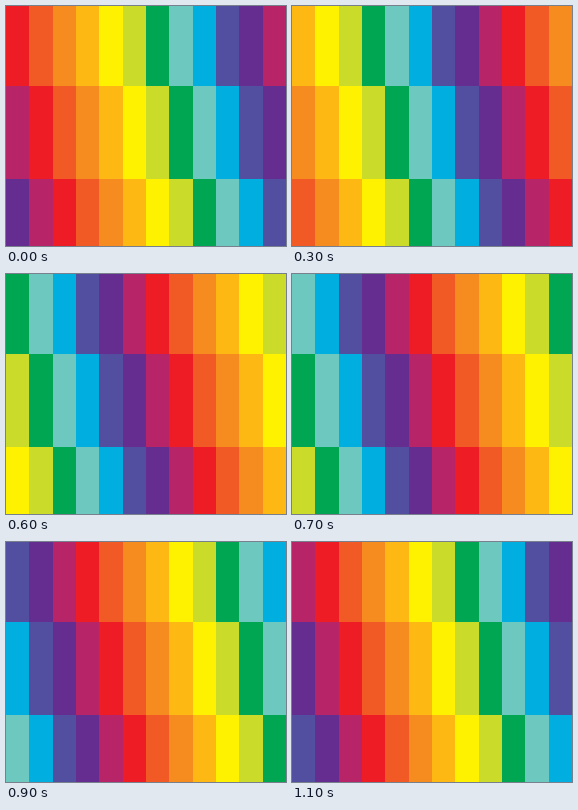
An HTML page with a canvas that plays this animation: 280x240 px, repeating every 1200 ms.

```html
<!DOCTYPE html>
<html lang="en">
<head>
<meta charset="utf-8">
<title>Rainbow bands</title>
<style>
html, body { margin: 0; width: 100%; height: 100%; overflow: hidden; }
canvas { display: block; }
</style>
</head>
<body>
<canvas id="stage" width="280" height="240"></canvas>
<script>
const ctx = document.getElementById('stage').getContext('2d');
const colors = ['#ee1c25', '#f15a24', '#f68b1f', '#fdb813', '#fff200', '#cadb2a',
                '#00a651', '#6dc8bf', '#00aee0', '#524fa1', '#662d91', '#b72467'];
const count = colors.length;
const rowEdges = [0, 80, 173, 240];
const stepMs = 100;
const edge = col => Math.round(col * 280 / count);

function draw(now) {
  const step = Math.floor(now / stepMs) % count;
  for (let row = 0; row < 3; row++) {
    const top = rowEdges[row], height = rowEdges[row + 1] - top;
    for (let col = 0; col < count; col++) {
      // Each row lags one colour behind the row above.
      ctx.fillStyle = colors[(col + step - row + count) % count];
      ctx.fillRect(edge(col), top, edge(col + 1) - edge(col), height);
    }
  }
}

const start = performance.now();
function tick() {
  draw(performance.now() - start);
  requestAnimationFrame(tick);
}
tick();
</script>
</body>
</html>
```
